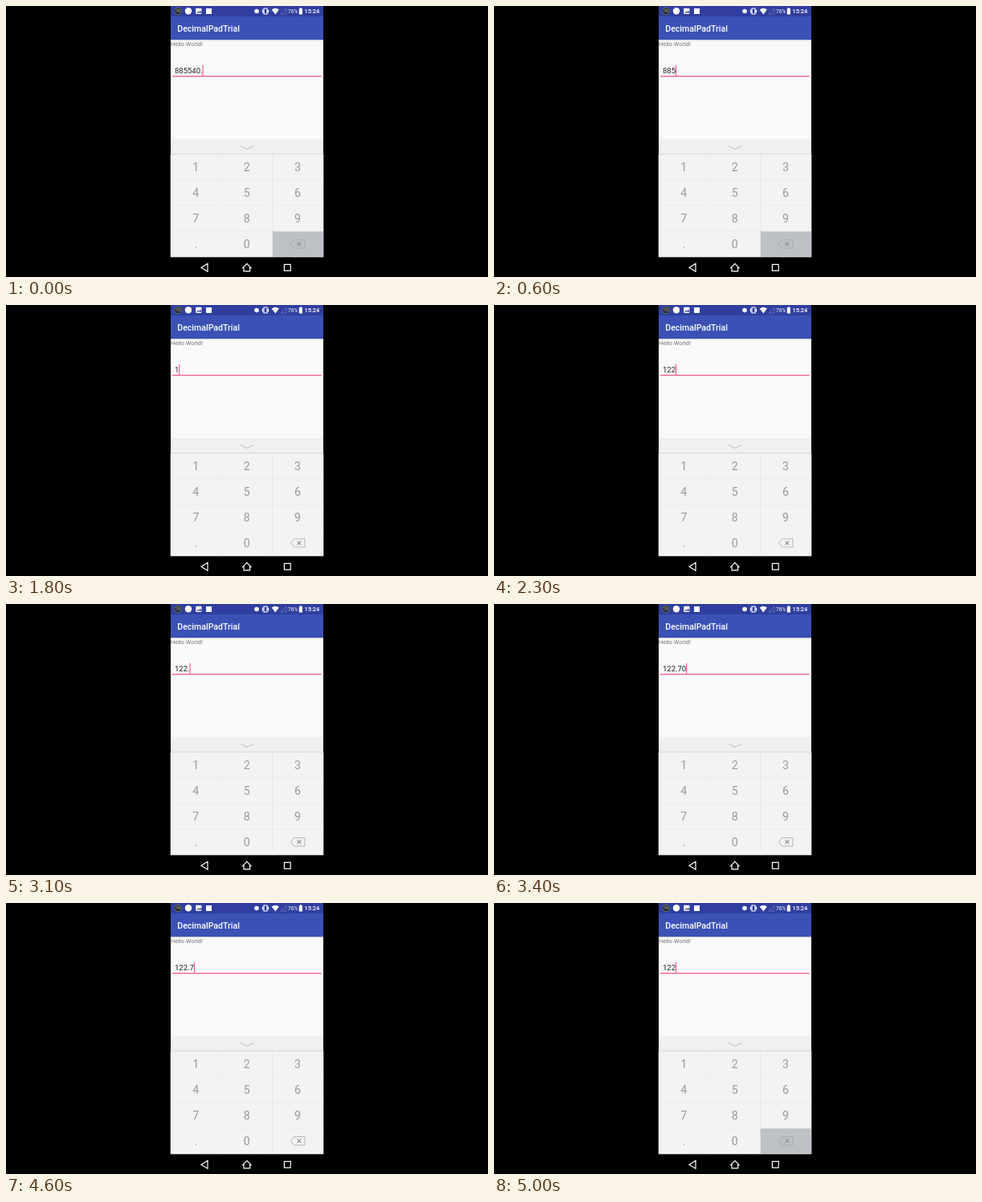
Recreate the animation shown at these times as an HTML page. Size 600 by 338 pixels, loop 5100 ms.

```html
<!DOCTYPE html>
<html lang="en">
<head>
<meta charset="utf-8">
<style>
  html, body { margin: 0; width: 100%; height: 100%; overflow: hidden; background: #000; }
  svg { display: block; width: 100vw; height: 100vh; font-family: Roboto, sans-serif; }
  .line { fill: none; stroke: #fff; stroke-width: 1.2; }
  .status { fill: #fff; font-size: 7.4px; }
  .key text { fill: #999; font-size: 14.2px; text-anchor: middle; }
  .key rect { fill: #f3f3f4; stroke: #e6e6e7; stroke-width: .6; }
  .key path { fill: none; stroke: #a6a6a6; stroke-width: .8; }
  .key .cross { stroke: #8c8c8c; stroke-width: 1.1; }
  .key.down rect { fill: #bdc1c5; }
  .key.down path { stroke: #a3a7aa; }
  .key.down .cross { stroke: #8d9194; }
</style>
</head>
<body>
<svg viewBox="0 0 600 338">
  <defs>
    <linearGradient id="shade" x2="0" y2="1">
      <stop stop-color="#ccc"/><stop offset="1" stop-color="#fafafa"/>
    </linearGradient>
  </defs>
  <rect width="600" height="338"/>
  <rect x="205" y="42" width="190" height="124" fill="#fafafa"/>
  <rect x="205" y="42" width="190" height="2" fill="url(#shade)"/>
  <rect x="205" width="190" height="13" fill="#303f9f"/>
  <rect x="205" y="13" width="190" height="29" fill="#3b51b5"/>

  <!-- status bar -->
  <circle cx="214" cy="6.5" r="4.2" fill="#1d2430" stroke="#6f7a62"/>
  <text x="214" y="8.4" font-size="5" fill="#d5d8c0" text-anchor="middle">76</text>
  <circle cx="227" cy="6.3" r="4.2" fill="#fff"/>
  <rect x="236.2" y="2.7" width="7.2" height="7.2" rx=".8" fill="#fff"/>
  <path d="M237.3 8.6l1.7-2.2 1.2 1.4 1.6-2.1 2 2.9z" fill="#303f9f"/>
  <rect x="249" y="3" width="7" height="7" fill="#fff"/>
  <circle cx="312" cy="6.5" r="2.8" fill="#fff"/>
  <path class="line" d="M321 3h4v7h-4zM319.5 4.5v4M326.5 4.5v4"/>
  <path d="M330.7 4.6q4.6-3.6 9.2 0L335.3 10.4z" fill="#fff"/>
  <path d="M342 10L349 3V10z" fill="none" stroke="#7782c0" stroke-width=".7"/>
  <text class="status" x="351" y="9.2" style="font-size:6.5px">76%</text>
  <path d="M364.8 3.2h1.2V2.3h1.8v.9h1.2V10.5h-4.2z" fill="#fff"/>
  <text class="status" x="371.5" y="9.3" font-weight="500">15:24</text>

  <text x="213.3" y="31.6" font-size="10.55" font-weight="500" fill="#fff">DecimalPadTrial</text>
  <text x="205" y="50" font-size="7.4" fill="#737373">Hello World!</text>

  <!-- input field -->
  <rect x="207" y="87.1" width="185.5" height="1.2" fill="#ef4f87"/>
  <text id="field" x="210" y="84.3" font-size="9.5" fill="#202020"></text>
  <rect id="caret" y="73.7" width="1" height="13.2" fill="#ff4081"/>

  <!-- keypad -->
  <rect x="205" y="166" width="190" height="147" fill="#f0f0f1"/>
  <path d="M292 174.6l8 4 8-4" fill="none" stroke="#b5b5b5" stroke-width=".9"/>
  <g id="pad"></g>
  <rect x="205" y="184.2" width="190" height="1" fill="#d9d9da"/>

  <!-- navigation bar -->
  <path class="line" d="M243 326.2L251 321.3V331.2zM294.7 326.6L299.8 321.3 305 326.6H303.6V330.8H296V326.6zM346.4 322.4h7.8v7.8h-7.8z"/>
</svg>
<script>
  const DURATION = 5100, ERASE = 11;
  const field = document.getElementById('field');
  const caret = document.getElementById('caret');
  const pad = document.getElementById('pad');

  const icon = '<path d="M354.5 296.8l4-5.2H372v10.4H358.5z"/>' +
    '<path class="cross" d="M362.6 294.5l4.6 4.6m0-4.6l-4.6 4.6"/>';
  pad.innerHTML = [...'123456789.0', ''].map((label, i) => {
    const x = 205 + (i % 3) * 63.33, y = 185 + Math.floor(i / 3) * 32;
    const face = label ? `<text x="${x + 31.3}" y="${y + 21.1}">${label}</text>` : icon;
    return `<g class="key"><rect x="${x}" y="${y}" width="63.33" height="32"/>${face}</g>`;
  }).join('');

  // [start ms, text, pressed key, caret hidden]
  const steps = [];
  const add = (time, text, key = -1, hidden = false) => steps.push([time, text, key, hidden]);

  // Each erase tap removes a character on press, then lets go.
  function eraseTaps(start, text, count, period, hold) {
    for (let i = 0; i < count; i++) {
      const left = text.slice(0, text.length - i);
      add(start + i * period, left, ERASE);
      add(start + i * period + hold, left);
    }
  }

  eraseTaps(0, '885540.', 4, 150, 90);
  eraseTaps(600, '885', 4, 170, 90);
  eraseTaps(1300, '', 1, 100, 100);
  add(1500, '', -1, true);
  add(1700, '1');
  add(1900, '1', 1);
  add(2000, '12');
  add(2200, '12', 1);
  add(2300, '122');
  add(2700, '122', -1, true);
  add(3000, '122', 9);
  add(3100, '122.');
  add(3200, '122.', 6);
  add(3300, '122.7', 10);
  add(3400, '122.70');
  add(3700, '122.70', -1, true);
  add(4200, '122.70');
  eraseTaps(4300, '122.7', 1, 100, 200);
  eraseTaps(4700, '122.', 1, 100, 100);
  add(5000, '122', ERASE);

  let shown;
  function draw() {
    const time = performance.now() % DURATION;
    const step = steps.findLast(s => s[0] <= time);
    if (step !== shown) {
      shown = step;
      const [, text, key, hidden] = step;
      field.textContent = text;
      caret.setAttribute('x', 210 + (text ? field.getComputedTextLength() : 0));
      caret.style.visibility = hidden ? 'hidden' : 'visible';
      [...pad.children].forEach((el, i) => el.classList.toggle('down', i === key));
    }
    requestAnimationFrame(draw);
  }
  draw();
</script>
</body>
</html>
```
